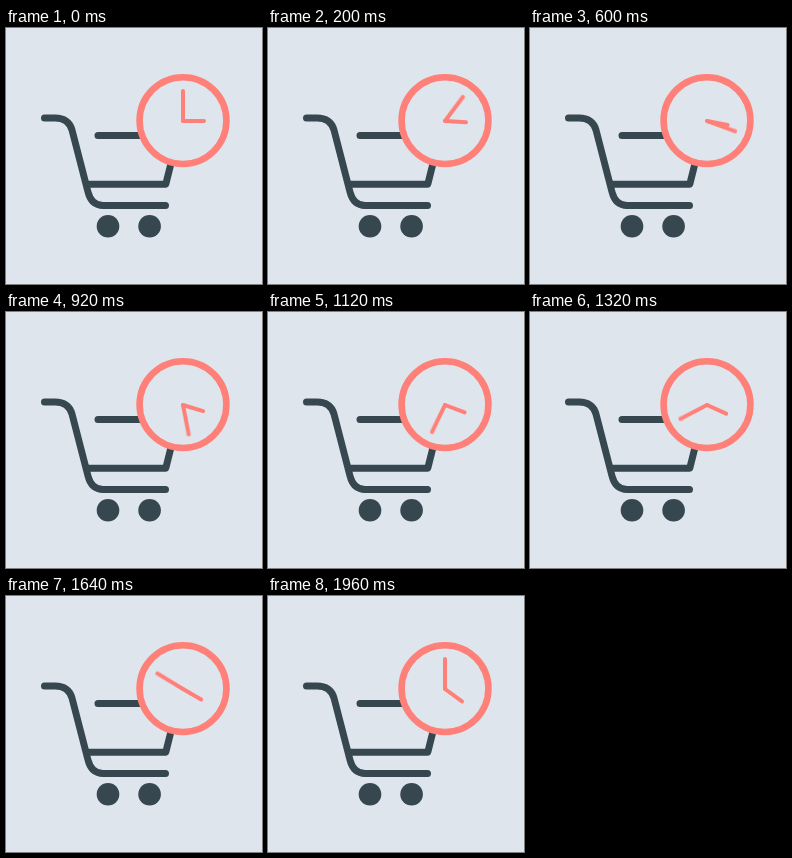
Recreate the animation shown at these times as an HTML page with a canvas. Size 256 by 256 pixels, loop 2 s.

```html
<!DOCTYPE html>
<html lang="en">
<head>
<meta charset="utf-8">
<title>Cart and clock</title>
<style>
  html, body { margin: 0; width: 100%; height: 100%; overflow: hidden; background: #dfe5ed; }
  canvas, svg { position: absolute; left: 0; top: 0; width: 256px; height: 256px; }
</style>
</head>
<body>
<svg viewBox="0 0 256 256">
  <g fill="none" stroke="#36474f" stroke-width="7" stroke-linecap="round" stroke-linejoin="round">
    <path d="M38.5 90H49Q62.5 90 66 102L82 164Q85.5 177.5 97 177.5H159.5"/>
    <path d="M82 156.2H159.8L172 107.5H92"/>
  </g>
  <g fill="#36474f">
    <circle cx="102" cy="198.3" r="11.3"/>
    <circle cx="143.6" cy="198.3" r="11.3"/>
  </g>
  <circle cx="177" cy="92.6" r="43.4" fill="#dfe5ed" stroke="#ff8078" stroke-width="6.6"/>
</svg>
<canvas width="256" height="256"></canvas>
<script>
  const canvas = document.querySelector('canvas');
  const ctx = canvas.getContext('2d');
  const LOOP = 2000, STEP = 40, LAST = LOOP / STEP - 1;
  const BLUR = 3.6, SAMPLES = 8;
  const start = performance.now();

  ctx.lineCap = 'round';
  ctx.lineWidth = 4;
  ctx.strokeStyle = '#ff8078';

  function hand(degrees, length) {
    const a = degrees * Math.PI / 180;
    ctx.beginPath();
    ctx.moveTo(177, 93);
    ctx.lineTo(177 + length * Math.sin(a), 93 - length * Math.cos(a));
    ctx.stroke();
  }

  function draw(now) {
    const step = Math.floor(Math.max(0, now - start) % LOOP / STEP);
    const p = step / LAST;
    const spread = step === 0 || step === LAST ? 0 : BLUR;
    ctx.clearRect(0, 0, 256, 256);

    // Averaged samples give the minute hand its motion blur.
    ctx.globalCompositeOperation = 'lighter';
    ctx.globalAlpha = 1 / SAMPLES;
    for (let i = 0; i < SAMPLES; i++) {
      hand(360 * p + spread * (i / (SAMPLES - 1) - 0.5), 30);
    }

    ctx.globalCompositeOperation = 'source-over';
    ctx.globalAlpha = 1;
    hand(90 + 36 * p, 21);
    requestAnimationFrame(draw);
  }
  draw(start);
</script>
</body>
</html>
```
